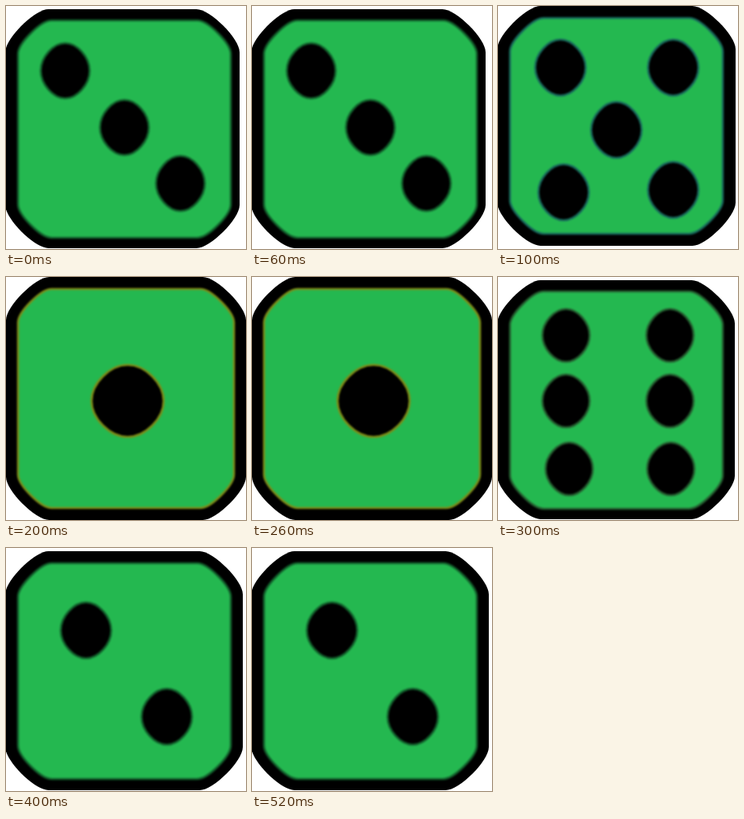
Recreate the animation shown at these times as an HTML page. Size 300x304 px, loop 600 ms.

```html
<!DOCTYPE html>
<html lang="en">
<head>
<meta charset="utf-8">
<title>Rolling die</title>
<style>
  html, body { margin: 0; width: 100%; height: 100%; overflow: hidden; background: #fff; }
  svg { display: block; width: 100vw; height: 100vh; }
</style>
</head>
<body>
<svg viewBox="0 0 300 304" preserveAspectRatio="none">
  <filter id="soft" filterUnits="userSpaceOnUse" x="0" y="0" width="300" height="304"
    color-interpolation-filters="sRGB"><feGaussianBlur stdDeviation="0.9"/></filter>
  <path id="rim"/>
  <g id="top" filter="url(#soft)" stroke-width="2.6">
    <path id="face" fill="#24b850"/>
    <path id="pips"/>
  </g>
</svg>
<script>
const STEP = 100, LOOP = 600;
const RIM_R = 54, FACE_R = 42;
const $ = id => document.getElementById(id);

// boxes: left, top, right, bottom; size: pip radii
const rolls = [
  { rim: [-1, 4, 292, 303], face: [15, 18, 281, 290], edge: "#12602c",
    size: [30.5, 34.5], pips: [[74, 81], [148, 152], [218, 222]] },
  { rim: [-1, 0, 297, 300], face: [15, 15, 281, 285], edge: "#17675a",
    size: [31.5, 35], pips: [[78, 77], [219, 77], [148, 155], [82, 233], [219, 230]] },
  { rim: [0, 0, 300, 304], face: [15, 15, 285, 289], edge: "#7d8c18",
    size: [45, 45], pips: [[152, 155]] },
  { rim: [-1, 4, 296, 303], face: [15, 18, 281, 290], edge: "#245f30",
    size: [29.5, 33], pips: [[85, 73], [215, 73], [85, 155], [215, 155], [89, 240], [216, 240]] },
  { rim: [-1, 4, 296, 303], face: [15, 19, 281, 289], edge: "#12602c",
    size: [31.5, 35], pips: [[100, 103], [201, 211]] }
];

// box with flattened corners; bulge 0.55 would be a true ellipse arc
function rounded([l, t, r, b], rx, ry, bulge) {
  const u = rx * bulge, v = ry * bulge;
  return `M${l + rx} ${t}H${r - rx}c${u} 0 ${rx} ${ry - v} ${rx} ${ry}` +
    `V${b - ry}c0 ${v} ${u - rx} ${ry} ${-rx} ${ry}` +
    `H${l + rx}c${-u} 0 ${-rx} ${v - ry} ${-rx} ${-ry}` +
    `V${t + ry}c0 ${-v} ${rx - u} ${-ry} ${rx} ${-ry}Z`;
}

const pip = (x, y, rx, ry) => rounded([x - rx, y - ry, x + rx, y + ry], rx, ry, 0.49);

let shown = -1;
function draw(time) {
  const i = Math.min(Math.floor((time % LOOP) / STEP), rolls.length - 1);
  if (i === shown) return;
  shown = i;
  const { rim, face, edge, size, pips } = rolls[i];
  $("rim").setAttribute("d", rounded(rim, RIM_R, RIM_R, 0.32));
  $("face").setAttribute("d", rounded(face, FACE_R, FACE_R, 0.32));
  $("pips").setAttribute("d", pips.map(([x, y]) => pip(x, y, ...size)).join(""));
  $("top").setAttribute("stroke", edge);
}

const start = performance.now();
function tick() {
  draw(performance.now() - start);
  requestAnimationFrame(tick);
}
tick();
</script>
</body>
</html>
```
